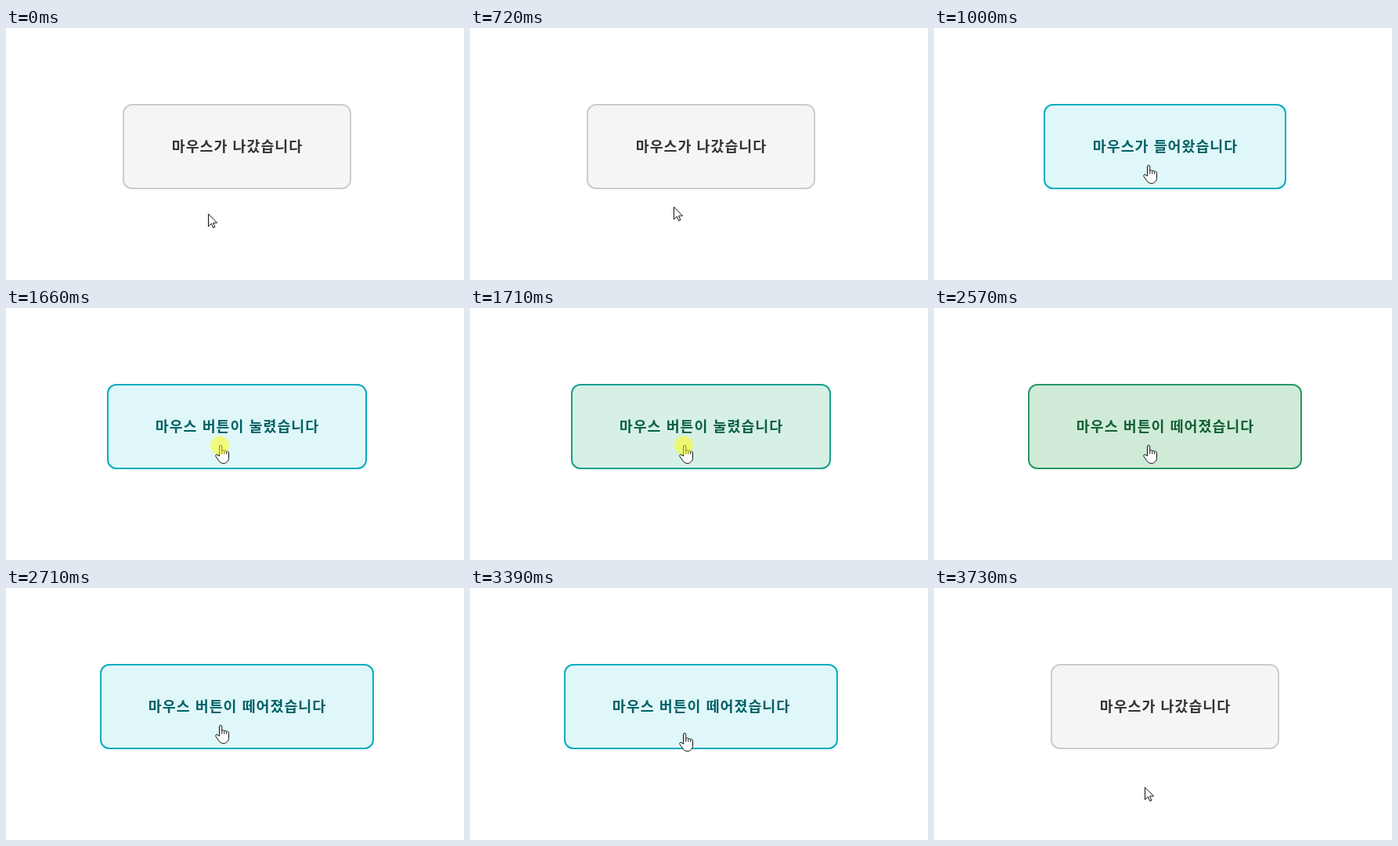
An HTML page for the animation above (4050 ms loop, 585 by 322 pixels).

```html
<!DOCTYPE html>
<html lang="ko">
<head>
<meta charset="utf-8">
<title>Mouse events</title>
<style>
  html, body { margin: 0; width: 100%; height: 100%; overflow: hidden; background: #fff; }
  svg { display: block; width: 585px; height: 322px; }
  text { font: 700 18.4px "Noto Sans CJK KR", "Noto Sans CJK", "Noto Sans KR", sans-serif; letter-spacing: 1px; text-anchor: middle; }
  .cursor { fill: #fff; stroke: #111; stroke-width: 1; stroke-linejoin: round; }
</style>
</head>
<body>
<svg viewBox="0 0 585 322">
  <rect width="585" height="322" fill="#fff"/>
  <rect id="box" y="98" height="107" rx="11" stroke-width="2"/>
  <text id="label" x="295.5" y="158"></text>
  <path id="arrow" class="cursor" d="M.5 .7V16.5L4.4 12.8 6.7 18.3 8.9 17.4 6.6 12H11.6Z"/>
  <g id="hand" class="cursor">
    <path d="M5.5 14.2V2.1a1.65 1.65 0 0 1 3.3 0V7.2c.8-1 2.7-.7 3 .6c.8-.9 2.5-.6 2.8.6c1-.6 2.9 0 2.9 1.7V16c0 4.3-2.6 7.5-6.6 7.5c-3.2 0-5-1.5-6.3-3.7L.9 14.6c-.9-1.6 .8-2.9 2.2-1.9Z"/>
    <path d="M8.8 7V11.5M11.8 7.8V11.5M14.6 8.4V11.5" fill="none"/>
  </g>
  <circle id="press" cx="273" cy="175.5" r="12" fill="#ff0" fill-opacity=".5"/>
</svg>
<script>
const LOOP = 4050;
const FADE = 200;
const TICKS = [0, 600, 670, 730, 800, 870, 930, 1000, 1660, 1710, 1780, 1850,
  2570, 2640, 2710, 3390, 3450, 3520, 3590, 3660, 3730];

// Each style: fill, border, text
const IDLE = [[245, 245, 245], [204, 204, 204], [51, 51, 51]];
const HOVER = [[224, 247, 250], [0, 172, 193], [0, 96, 100]];
const ACTIVE = [[200, 230, 201], [56, 142, 60], [27, 94, 32]];

// at: event time, fade: start of the colour transition, w: outer box width
const STATES = [
  { at: 0, fade: -FADE, from: IDLE, to: IDLE, w: 292, msg: "마우스가 나갔습니다" },
  { at: 800, fade: 785, from: IDLE, to: HOVER, w: 310, msg: "마우스가 들어왔습니다" },
  { at: 1660, fade: 1660, from: HOVER, to: ACTIVE, w: 332, msg: "마우스 버튼이 눌렸습니다" },
  { at: 2570, fade: 2529, from: ACTIVE, to: HOVER, w: 350, msg: "마우스 버튼이 떼어졌습니다" },
  { at: 3520, fade: 3500, from: HOVER, to: IDLE, w: 292, msg: "마우스가 나갔습니다" }
];

const $ = id => document.getElementById(id);
const [box, label, arrow, hand, press] = ["box", "label", "arrow", "hand", "press"].map($);
const clamp = v => Math.min(1, Math.max(0, v));
const lerp = (a, b, k) => a + (b - a) * k;
const glide = u => (1 - Math.cos(Math.PI * clamp(u))) / 2;
const rgb = (a, b, k) => `rgb(${a.map((v, i) => Math.round(lerp(v, b[i], k)))})`;
const show = (el, on) => el.setAttribute("visibility", on ? "visible" : "hidden");
const last = (list, ok) => list.filter(ok).pop();

// CSS "ease": cubic-bezier(.25, .1, .25, 1)
function ease(x) {
  if (x <= 0 || x >= 1) return clamp(x);
  const bez = (p, q, s) => 3 * p * s * (1 - s) ** 2 + 3 * q * s * s * (1 - s) + s ** 3;
  let lo = 0, hi = 1;
  for (let i = 0; i < 20; i++) {
    const mid = (lo + hi) / 2;
    if (bez(.25, .25, mid) < x) lo = mid; else hi = mid;
  }
  return bez(.1, 1, lo);
}

function pointer(t) {
  if (t < 2000) {
    const k = glide((t - 570) / 390);
    return [lerp(258, 273, k), lerp(237, 176, k)];
  }
  const k = glide((t - 3310) / 350);
  return [lerp(273, 269, k), lerp(176, 254, k)];
}

function draw(now) {
  const time = now % LOOP;
  const t = last(TICKS, v => v <= time);
  const s = last(STATES, v => v.at <= t);
  const k = ease((t - s.fade) / FADE);
  const [fill, border, ink] = s.from.map((c, i) => rgb(c, s.to[i], k));

  box.setAttribute("x", 295 - s.w / 2 + 1);
  box.setAttribute("width", s.w - 2);
  box.setAttribute("fill", fill);
  box.setAttribute("stroke", border);
  label.setAttribute("fill", ink);
  if (label.textContent !== s.msg) label.textContent = s.msg;

  const [x, y] = pointer(t).map(Math.round);
  const inside = y < 206;
  arrow.setAttribute("transform", `translate(${x} ${y})`);
  hand.setAttribute("transform", `translate(${x - 6} ${y - 1})`);
  show(arrow, !inside);
  show(hand, inside);
  show(press, t >= 1660 && t < 2570);
}

const start = performance.now();
function loop() {
  draw(performance.now() - start);
  requestAnimationFrame(loop);
}
loop();
</script>
</body>
</html>
```
